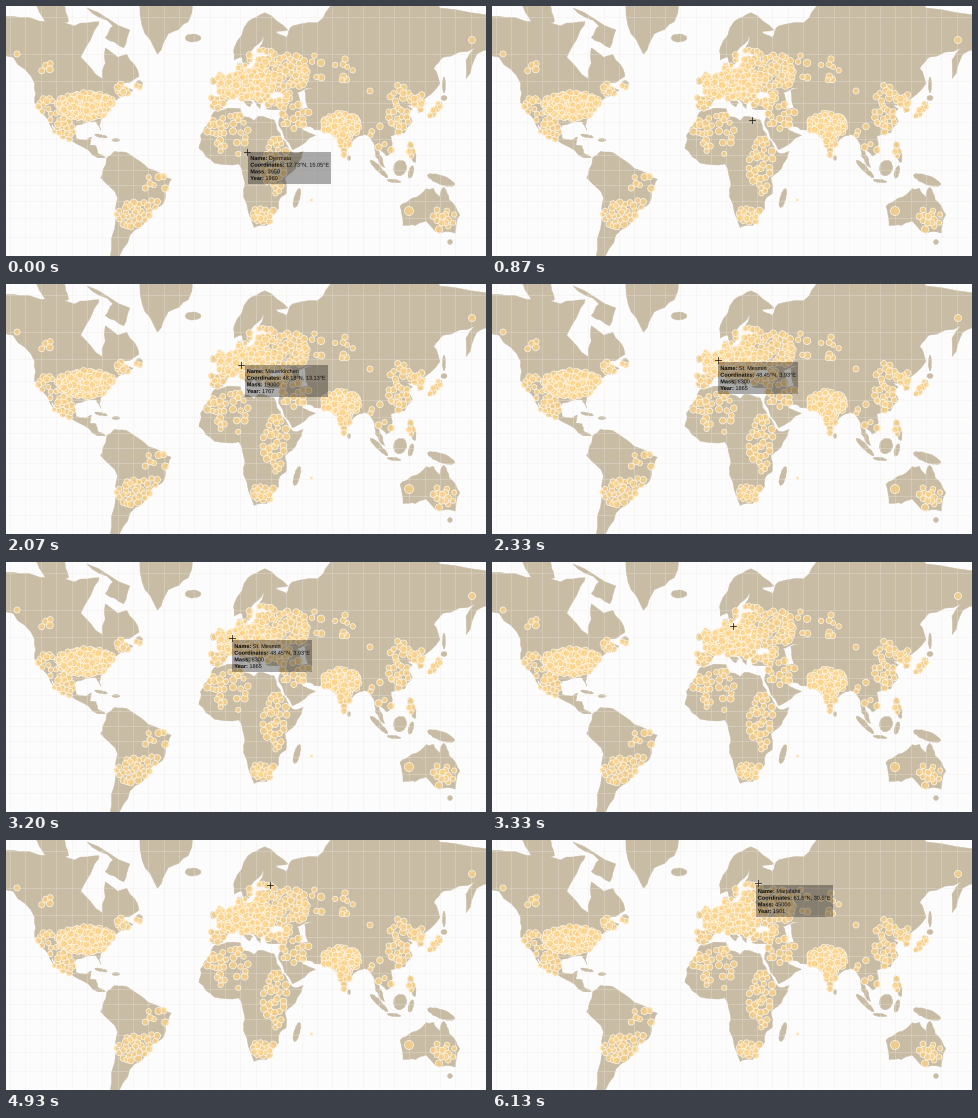
Recreate the animation shown at these times as a matplotlib script. Size 480 px wide and 250 px high, loop 6190 ms.

```python
import numpy as np
import matplotlib.pyplot as plt
from matplotlib.animation import FuncAnimation
from matplotlib.collections import EllipseCollection, LineCollection
from matplotlib.patches import PathPatch, Polygon, Rectangle
from matplotlib.path import Path
from matplotlib.textpath import TextPath
from matplotlib.transforms import Affine2D

W, H, DPI = 480, 250, 100
LOOP, TICKS = 6190, 93
PX = 72 / DPI
SEA, LAND = "#fdfcfc", "#c8bca5"
KEYS = ("Name", "Coordinates", "Mass", "Year")
rng = np.random.default_rng(7)


def project(lon, lat):
    """Mercator, in stage pixels."""
    k = 1.535
    y = np.log(np.tan(np.pi / 4 + np.radians(lat) / 2))
    return 219 + k * np.asarray(lon), 164 - np.degrees(k) * y


def roughen(xy):
    """Insert a slightly displaced midpoint into every short edge."""
    step = np.roll(xy, -1, axis=0) - xy
    size = np.hypot(*step.T)
    push = rng.uniform(-1, 1, len(xy)) * np.where(size < 45, np.minimum(.12, 1.8 / size), 0)
    mid = xy + step / 2 + step[:, ::-1] * [1, -1] * push[:, None]
    return np.stack([xy, mid], axis=1).reshape(-1, 2)


shapes = []


def add_shape(xy, levels=2):
    for _ in range(levels):
        xy = roughen(xy)
    ax.add_patch(Polygon(xy, fc=LAND, ec=LAND, lw=.4 * PX, zorder=1))
    shapes.append(Path(xy))


def coast(*flat):
    lon, lat = np.reshape(flat, (-1, 2)).T
    add_shape(np.column_stack(project(lon, lat)))


def island(x, y, w, h, angle=0):
    t = np.linspace(0, 2 * np.pi, 12, endpoint=False)
    oval = np.column_stack([w * np.cos(t), h * np.sin(t)]) / 2
    add_shape(Affine2D().rotate_deg(angle).translate(x, y).transform(oval), 1)


def draw_land():
    # North America and the Arctic
    coast(-150, 60, -138, 59, -124, 49, -124, 40, -117, 33, -110, 23, -114, 31,
          -105, 20, -95, 16, -83, 8, -78, 8, -83, 11, -84, 15.5, -88, 16,
          -87, 21, -91, 19, -97, 20, -97, 28, -84, 30, -81, 25, -81, 31,
          -70, 42, -60, 46, -69, 48, -56, 52, -64, 60, -70, 59, -78, 62,
          -80, 51, -94, 59, -86, 66, -82, 69, -98, 68, -128, 70, -150, 70)
    coast(-66, 62, -78, 65, -73, 68, -90, 72, -62, 67)
    coast(-117, 69, -102, 69, -105, 73, -125, 73)
    coast(-44, 60, -54, 68, -58, 76, -18, 76, -24, 69, -37, 66)
    # South America
    coast(-77, 8, -72, 12, -62, 10, -50, 1, -35, -6, -39, -14, -41, -22,
          -48, -26, -54, -34, -62, -39, -69, -52, -75, -50, -71, -30,
          -70, -18, -81, -5, -78, 3)
    # Africa
    coast(-6, 36, 10, 37, 11, 33.5, 19, 30.5, 22, 33, 32, 31, 37, 20, 44, 11,
          51, 12, 47, 4, 39, -5, 40, -15, 35, -20, 35, -24, 27, -34, 19, -35,
          12, -17, 13, -9, 9, 4, -7, 4.5, -17, 14, -16, 22, -10, 30)
    # Europe, Scandinavia
    coast(-9, 37, -9, 43, -2, 43.5, -5, 48, 8, 54, 8, 57, 11, 57, 11, 54,
          20, 55, 23, 59, 30, 60, 66, 60, 66, 46, 53, 47, 47, 45, 50, 40,
          41, 42, 37, 45, 31, 46, 28, 42, 23, 40, 23, 37, 19, 41, 13, 45.5,
          18, 40, 16, 38, 10, 44, 3, 43, -2, 37)
    coast(30, 59, 22, 61, 25, 65.5, 17, 61, 16, 57, 13, 55.5, 11, 59, 6, 58,
          6, 62, 15, 69, 26, 71, 41, 67, 33, 66.5, 40, 65, 44, 68, 66, 69,
          66, 57)
    # Middle East, northern and southern Asia
    coast(27, 37, 27, 40.5, 42, 43, 48, 42, 49, 37, 62, 37, 62, 25, 56, 27,
          48, 30, 51, 25, 59, 22, 44, 13, 35, 28, 36, 36.5)
    coast(54, 38, 52, 46, 61, 47, 61, 69, 70, 73, 130, 75, 140, 72, 180, 70,
          180, 63, 164, 60, 157, 51, 157, 58, 163, 62, 142, 59, 136, 55,
          140, 49, 128, 39)
    coast(54, 37, 54, 41, 130, 43, 126, 39.5, 129, 36, 126, 35, 125, 39.5,
          118, 39, 122, 37, 119, 35, 122, 30, 117, 23.5, 108, 21.5, 109, 12,
          105, 9, 100, 13, 104, 1.5, 98, 9, 97, 17, 91, 22.5, 87, 21.5,
          80, 15, 77.5, 8, 73, 20, 67, 25, 58, 25.5)
    # Australia
    coast(114, -23, 116, -34, 124, -34, 131, -31.5, 140, -38, 150, -38,
          153, -28, 146, -19, 142.5, -11, 140, -17.5, 136, -12, 131, -12,
          122, -18)
    island(187, 32, 16, 8)
    island(216, 75, 6, 17, -18)
    island(207, 75, 5, 7)
    island(291, 192, 6, 20, 15)
    island(95, 130, 13, 3, 12)
    island(110, 134, 8, 3)
    island(133, 78, 7, 7)
    island(343, 152, 3, 5)
    island(373, 163, 5, 25, -45)
    island(388, 175, 14, 3, 8)
    island(394, 162, 13, 16, 20)
    island(405, 166, 5, 13, 15)
    island(435, 174, 29, 9, 20)
    island(406, 146, 6, 22, -15)
    island(429, 104, 5, 20, 40)
    island(438, 92, 6, 5)
    island(438, 79, 3, 16)
    island(444, 236, 5, 5)


def draw_grid():
    xs = project(np.arange(-140, 171, 10), 0)[0]
    ys = project(0, np.arange(-40, 71, 10))[1]
    lines = [[(x, 0), (x, H)] for x in xs] + [[(0, y), (W, y)] for y in ys]
    ax.add_collection(LineCollection(lines, colors="#eeeae3", alpha=.5,
                                     linewidths=.6 * PX, zorder=2))
    ax.plot([140, 410], [249.7, 249.7], color="#d4d4d4", lw=PX, alpha=.6)


# Fields of strikes: centre x, y, half width, half height, count
FIELDS = [
    (42, 62, 8, 7, 4), (42, 103, 14, 12, 14), (80, 100, 30, 13, 140),
    (58, 125, 10, 13, 22), (122, 83, 14, 6, 9), (132, 209, 23, 13, 30),
    (150, 182, 14, 14, 9), (222, 128, 24, 22, 30), (269, 160, 14, 28, 32),
    (258, 209, 13, 8, 18), (210, 95, 9, 9, 24), (238, 76, 30, 17, 210),
    (284, 66, 19, 17, 45), (256, 51, 13, 9, 22), (268, 91, 18, 8, 26),
    (320, 64, 28, 16, 14), (288, 108, 18, 16, 16), (335, 120, 18, 14, 85),
    (338, 139, 6, 12, 20), (398, 100, 22, 22, 32), (428, 102, 14, 10, 24),
    (380, 125, 20, 20, 10), (404, 142, 6, 8, 8), (438, 213, 12, 12, 14)]


def scatter(cx, cy, rx, ry, count):
    """Random spots on land inside an ellipse, kept apart."""
    found = []
    apart = 1.8 if count > 60 else 3.6
    for _ in range(count * 30):
        d = rng.uniform(-1, 1, 2)
        p = np.array([cx, cy]) + d * [rx, ry]
        if (d @ d < 1 and all(np.hypot(*(p - q)) > apart for q in found)
                and any(s.contains_point(p) for s in shapes)):
            found.append(p)
            if len(found) == count:
                break
    return found


def draw_strikes():
    spots = [p for field in FIELDS for p in scatter(*field)]
    size = rng.uniform(5, 7.4, len(spots))
    spots += [(11, 48), (466, 34), (364, 85), (403, 205), (305.5, 194)]
    size = np.append(size, [6, 7, 6, 9, 3])
    ax.add_collection(EllipseCollection(
        size, size, np.zeros(len(size)), units="xy", offsets=spots,
        offset_transform=ax.transData, facecolors=(.99, .82, .52, .72),
        edgecolors=(1, .97, .9, .9), linewidths=.8 * PX, zorder=3))


def glyphs(text, weight):
    return TextPath((0, 0), text, size=5.55,
                    prop={"family": "Liberation Sans", "weight": weight})


def make_tip(corner, values):
    x, y = corner
    parts, width = [], 0
    for row, (key, value) in enumerate(zip(KEYS, values)):
        label, text = glyphs(key + ":", "bold"), glyphs(value, "normal")
        gap = label.get_extents().x1 + 2.1
        width = max(width, gap + text.get_extents().x1)
        for part, dx in ((label, 0), (text, gap)):
            move = Affine2D().scale(1, -1).translate(x + 2.3 + dx, y + 8 + 6.67 * row)
            parts.append(PathPatch(move.transform_path(part), fc="#0a0a0a", lw=0, zorder=6))
    box = Rectangle(corner, width + 4.8, 32, fc="black", alpha=.33, lw=0, zorder=5)
    return [ax.add_patch(p) for p in [box] + parts]


TAUTI = ("Tauti", "46.72°N, 23.5°E", "21000", "1938")
# Start tick, end tick, pointer, box corner, values
TIPS = [
    (0, 2, (240.5, 146), (242, 146), ("Djermaia", "12.73°N, 15.05°E", "3950", "1960")),
    (20, 24, (254, 82), (254, 82), TAUTI),
    (24, 26, (250.5, 82), (250.5, 82), TAUTI),
    (30, 33, (235, 80.5), (238.5, 81), ("Mauerkirchen", "48.18°N, 13.13°E", "19000", "1767")),
    (33, 49, (225.5, 75.5), (226, 78), ("St. Mesmin", "48.45°N, 3.93°E", "8300", "1865")),
    (52, 73, (255.5, 52), (255, 53), ("Pillistfer", "58.67°N, 25.73°E", "23250", "1862")),
    (78, TICKS, (265.5, 42.5), (263.5, 45), ("Marjalahti", "61.5°N, 30.5°E", "45000", "1901")),
]
# The pointer rests at each tip and passes two spots in between
stops = [(t, *at) for a, b, at, *_ in TIPS for t in (a, b - 1)]
stops += [(6, 262, 127), (10, 262, 127), (74, 264, 44.5)]
when, px, py = np.array(sorted(stops)).T

fig = plt.figure(figsize=(W / DPI, H / DPI), dpi=DPI, facecolor=SEA)
ax = fig.add_axes([0, 0, 1, 1])
ax.axis("off")
draw_land()
draw_grid()
draw_strikes()
tips = [(a, b, make_tip(corner, values)) for a, b, _, corner, values in TIPS]
cross, = ax.plot([], [], color="#222222", lw=.8 * PX, zorder=7)
ax.set_xlim(0, W)
ax.set_ylim(H, 0)


def update(i):
    for start, end, parts in tips:
        for part in parts:
            part.set_visible(start <= i < end)
    x, y = np.interp(i, when, px), np.interp(i, when, py)
    cross.set_data([x - 3, x + 3, np.nan, x, x], [y, y, np.nan, y - 3, y + 3])
    return [cross]


anim = FuncAnimation(fig, update, frames=TICKS, interval=LOOP / TICKS, repeat=True,
                     repeat_delay=0, init_func=lambda: update(0))
plt.show()
```
